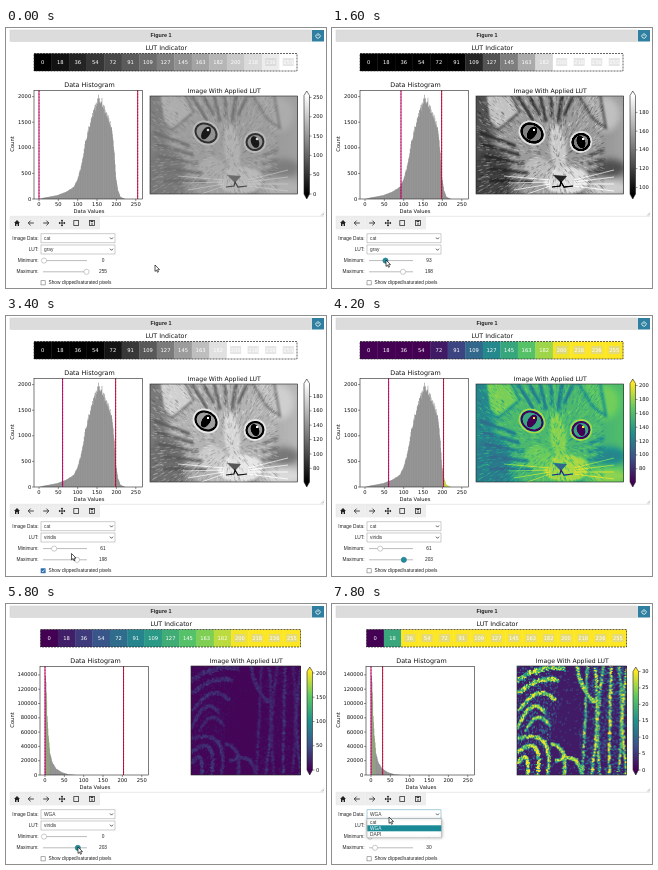
Write an HTML page with a canvas that moves like this. It is 320 px wide and 260 px high and loops after 8000 ms.

```html
<!DOCTYPE html>
<html lang="en">
<head>
<meta charset="utf-8">
<title>LUT explorer</title>
<style>
html, body { margin: 0; width: 100%; height: 100%; overflow: hidden; background: #fff; }
canvas { display: block; width: 320px; height: 260px; }
</style>
</head>
<body>
<canvas id="stage"></canvas>
<script>
const LOOP = 8000, STEP = 200;
const stage = document.getElementById('stage');
const c = stage.getContext('2d');
const dpr = window.devicePixelRatio || 1;
stage.width = 320 * dpr;
stage.height = 260 * dpr;
c.scale(dpr, dpr);

const PLOT_FONT = '"DejaVu Sans", sans-serif';
const UI_FONT = '"Liberation Sans", sans-serif';
const TEAL = '#238b9b';

// Timeline: [ms, value] keys, linear in between
const MIN = [[200, 0], [600, 93], [1600, 93], [2000, 61], [5200, 61], [5600, 0]];
const MAX = [[1000, 255], [1400, 198], [3600, 198], [3800, 203], [5800, 203], [6400, 36], [6600, 30]];
const CURSOR_X = [[0, 149], [400, 39], [600, 54], [800, 84], [1000, 80], [1400, 71], [1600, 54], [2000, 48],
  [2600, 63], [2800, 63], [3000, 72], [3200, 60], [3600, 71], [3800, 72], [4000, 38], [4200, 60],
  [4600, 62], [5000, 45], [5200, 49], [5600, 39], [5800, 72], [6400, 43], [6600, 41], [6800, 41], [7200, 70], [7800, 57]];
const CURSOR_Y = [[0, 237], [400, 232], [600, 232], [800, 244], [1400, 243], [1600, 232], [2000, 232],
  [2600, 254], [2800, 254], [3000, 221], [3200, 232], [3600, 243], [3800, 243], [4000, 255], [4200, 264],
  [4600, 211], [5000, 223], [5200, 233], [5600, 232], [5800, 243], [6800, 243], [7200, 211], [7400, 211], [7800, 213]];

function track(keys, t) {
  if (t <= keys[0][0]) return keys[0][1];
  for (let i = 1; i < keys.length; i++) {
    const [t0, a] = keys[i - 1], [t1, b] = keys[i];
    if (t <= t1) return a + (b - a) * (t - t0) / (t1 - t0);
  }
  return keys[keys.length - 1][1];
}
const during = (t, a, b) => t >= a && t < b;

// Colour maps
const MAPS = {
  gray: [[0, 0, 0], [255, 255, 255]],
  viridis: [[68, 1, 84], [59, 82, 139], [33, 145, 140], [94, 201, 98], [253, 231, 37]]
};
function mapColor(name, f) {
  const stops = MAPS[name], p = Math.max(0, Math.min(1, f)) * (stops.length - 1);
  const i = Math.min(stops.length - 2, Math.floor(p));
  return stops[i].map((v, k) => Math.round(v + (stops[i + 1][k] - v) * (p - i)));
}
const css = rgb => `rgb(${rgb})`;

// Drawing helpers
function rect(x, y, w, h, fill, stroke, lineWidth = .6, g = c) {
  if (fill) { g.fillStyle = fill; g.fillRect(x, y, w, h); }
  if (stroke) { g.strokeStyle = stroke; g.lineWidth = lineWidth; g.strokeRect(x, y, w, h); }
}
function path(points, stroke, width = .7, fill, g = c) {
  g.beginPath();
  points.forEach(([x, y], i) => i ? g.lineTo(x, y) : g.moveTo(x, y));
  if (fill) { g.closePath(); g.fillStyle = fill; g.fill(); }
  if (stroke) { g.strokeStyle = stroke; g.lineWidth = width; g.stroke(); }
}
function ellipse(x, y, rx, ry, fill, angle = 0, stroke, g = c) {
  g.beginPath();
  g.ellipse(x, y, rx, ry, angle, 0, Math.PI * 2);
  if (fill) { g.fillStyle = fill; g.fill(); }
  if (stroke) { g.strokeStyle = stroke; g.lineWidth = .6; g.stroke(); }
}
function text(s, x, y, size, align = 'center', color = '#111', font = PLOT_FONT, weight = '') {
  c.font = `${weight} ${size}px ${font}`;
  c.textAlign = align;
  c.textBaseline = 'middle';
  c.fillStyle = color;
  c.fillText(s, x, y);
}
function seeded(seed) {
  return () => (seed = (seed * 16807) % 2147483647) / 2147483647;
}

// Intensity images, tinted through the colour map when drawn
const tone = (v, a = 1) => `rgba(${v},${v},${v},${a})`;
function makeImage(w, h, paint) {
  const canvas = document.createElement('canvas');
  canvas.width = w;
  canvas.height = h;
  const g = canvas.getContext('2d', { willReadFrequently: true });
  paint(g);
  return { w, h, values: g.getImageData(0, 0, w, h).data };
}

const catImage = makeImage(148, 98, g => {
  const rnd = seeded(31);
  const blob = (x, y, rx, ry, v, angle) => ellipse(x, y, rx, ry, tone(v), angle, null, g);
  const line = (x0, y0, x1, y1, v, w) => path([[x0, y0], [x1, y1]], tone(v), w, null, g);
  g.filter = 'blur(3px)';
  const back = g.createLinearGradient(0, 0, 148, 0);
  back.addColorStop(0, tone(125));
  back.addColorStop(1, tone(160));
  rect(-9, -9, 170, 120, back, null, 0, g);
  blob(128, 18, 16, 18, 172);
  blob(134, 72, 16, 9, 125);
  blob(132, 92, 22, 8, 178);
  blob(70, 46, 53, 58, 157, -.2);
  blob(16, 80, 20, 28, 120);
  g.filter = 'blur(1.2px)';
  path([[9, -2], [34, -2], [44, 16], [22, 34], [13, 26]], tone(120), 2, tone(173), g);
  path([[102, -2], [124, -2], [130, 32], [118, 24]], tone(122), 2, tone(165), g);
  blob(90, 84, 23, 14, 184);
  blob(62, 74, 14, 12, 170);
  blob(82, 52, 8, 24, 176, -.12);
  for (let i = 0; i < 6; i++) line(42 + i * 11, 0, 58 + i * 6, 26 - i % 2 * 6, 108, 2.6);
  for (let i = 0; i < 5; i++) line(2 + i * 3, 36 + i * 12, 40 + i * 4, 50 + i * 9, 106, 2.4);
  for (let i = 0; i < 3; i++) line(112, 60 + i * 8, 128, 54 + i * 10, 115, 2);
  g.filter = 'none';
  for (let i = 0; i < 1500; i++) {
    const x = rnd() * 122 + 4, y = rnd() * 98, a = Math.atan2(y - 62, x - 82), r = 2 + rnd() * 3;
    path([[x, y], [x + Math.cos(a) * r, y + Math.sin(a) * r]], tone(rnd() < .5 ? 100 : 202, .32), .7, null, g);
  }
  g.filter = 'blur(.4px)';
  const eye = (x, y, rx, ry, angle) => {
    blob(x, y, rx + 3, ry + 3, 185, angle);
    blob(x, y, rx + 1, ry + 1, 48, angle);
    blob(x, y, rx - 1, ry - 1, 146, angle);
    blob(x, y, 4, ry - 2, 24, angle);
    blob(x + 2, y - 3, 1.3, 1.3, 215);
  };
  eye(56, 37, 11, 9, .55);
  eye(105, 46, 8.5, 8, -.35);
  path([[77, 79], [91, 80], [85, 87]], null, 0, tone(108), g);
  path([[76, 91], [84, 90], [85, 86], [88, 91], [97, 90]], tone(70), 1.2, null, g);
  for (let i = 0; i < 4; i++) {
    line(74, 84 + i * 2, 28 + i * 5, 80 + i * 7, 208, .6);
    line(98, 84 + i * 2, 138, 74 + i * 7, 208, .6);
  }
});

const TISSUE_GAIN = 5;
const tissueImage = makeImage(110, 110, g => {
  const rnd = seeded(77);
  rect(0, 0, 110, 110, tone(12), null, 0, g);
  const speck = (x, y, v, s = 1) => rect(x, y, s, s, tone(Math.min(255, v | 0)), null, 0, g);
  for (let i = 0; i < 2600; i++) {
    const x = rnd() * 110, y = rnd() * 110;
    const middle = x > 34 + 9 * Math.sin(y / 22) && x < 66 + 4 * Math.sin(y / 15);
    if (!middle || rnd() < .2) speck(x, y, 25 + rnd() * (x > 66 || x < 35 ? 85 : 45));
  }
  const fibre = (x0, y0, x1, y1, x2, y2, spread, peak) => {
    for (let i = 0; i < 330; i++) {
      const u = rnd(), w = 1 - u, jitter = () => (rnd() + rnd() - 1) * spread;
      speck(w * w * x0 + 2 * w * u * x1 + u * u * x2 + jitter(),
        w * w * y0 + 2 * w * u * y1 + u * u * y2 + jitter(), 50 + rnd() * peak, rnd() < .3 ? 1.5 : 1);
    }
  };
  // folds on the left
  fibre(0, 14, 22, -2, 46, 2, 3, 160);
  fibre(0, 27, 24, 8, 40, 14, 2.5, 170);
  fibre(2, 44, 20, 15, 38, 34, 2, 170);
  fibre(0, 62, 14, 28, 27, 46, 2, 160);
  fibre(8, 65, 20, 40, 32, 60, 1.5, 130);
  fibre(0, 73, 38, 60, 30, 112, 2, 180);
  fibre(0, 86, 26, 66, 20, 110, 2, 180);
  fibre(0, 98, 12, 80, 10, 110, 2, 170);
  fibre(34, 78, 52, 82, 46, 110, 2, 140);
  fibre(38, 96, 60, 84, 64, 108, 2, 150);
  // long strands on the right
  for (let i = 0; i < 6; i++) {
    const x = 68 + i * 8;
    fibre(x + 2, 0, x + 8 * Math.sin(i * 2.1), 55, x - 3 + i, 110, 1.6, i % 2 ? 190 : 130);
  }
  fibre(60, 0, 62, 22, 78, 36, 2, 150);
});

const scratch = document.createElement('canvas');
function drawImage(image, gain, x, y, w, h, color) {
  scratch.width = image.w;
  scratch.height = image.h;
  const g = scratch.getContext('2d');
  const out = g.createImageData(image.w, image.h);
  const table = Array.from({ length: 256 }, (_, v) => color(v / gain));
  for (let i = 0; i < out.data.length; i += 4) {
    const rgb = table[image.values[i]];
    for (let k = 0; k < 3; k++) out.data[i + k] = rgb[k];
    out.data[i + 3] = 255;
  }
  g.putImageData(out, 0, 0);
  c.drawImage(scratch, x, y, w, h);
  rect(x, y, w, h, null, '#222', .6);
}

// Layout and histogram profile (value, count) of each data set
const DATA = {
  cat: {
    image: catImage, gain: 1, left: 28, strip: [28, 263], box: [144, 68, 147.5, 98], bar: 298,
    top: 2000, tick: 500, perTick: 25.6,
    profile: [[0, 0], [12, 25], [45, 70], [70, 140], [90, 240], [101, 430], [111, 720], [119, 1120], [126, 1330],
      [134, 1520], [144, 1780], [153, 1960], [160, 1950], [166, 1830], [173, 1660], [183, 1510], [188, 1370],
      [193, 1000], [198, 440], [203, 180], [210, 40], [222, 0]]
  },
  WGA: {
    image: tissueImage, gain: TISSUE_GAIN, left: 34, strip: [34.5, 260], box: [185, 62, 109.5, 109], bar: 301,
    top: 140000, tick: 20000, perTick: 14.3,
    profile: [[0, 146000], [3, 118000], [5, 86000], [8, 56000], [12, 32000], [18, 18000], [28, 9000], [42, 4000], [60, 800], [80, 0]]
  }
};

function drawHistogram(d, min, max, lut) {
  const x0 = d.left + 5, scale = .387, bottom = 171, unit = d.perTick / d.tick;
  const rnd = seeded(5);
  const mid = d.left + 54;
  for (let v = 0; v < 225; v++) {
    const h = track(d.profile, v) * unit * (.95 + rnd() * .09);
    let fill = '#808080';
    if (lut === 'viridis' && d.gain === 1 && v > max) fill = '#b8cf35';
    if (d.gain > 1 && v > 2 && v < 11) fill = '#7d9364';
    rect(x0 + v * scale, bottom - h, scale + .15, h, fill);
  }
  for (const [v, color] of [[min, '#d4006e'], [max, '#d90b35']]) {
    const x = x0 + v * scale;
    path([[x, 62.5], [x, 171]], color, 1);
    c.setLineDash([1.5, 1.5]);
    path([[x, 62.5], [x, 171]], '#70103c', .6);
    c.setLineDash([]);
  }
  rect(d.left, 62.5, 108.5, 108.5, null, '#222', .6);
  for (let v = 0; v <= 250; v += 50) {
    const x = x0 + v * scale;
    path([[x, 171], [x, 173]], '#222', .5);
    text(v, x, 177, 5.2);
  }
  for (let v = 0; v <= d.top; v += d.tick) {
    const y = bottom - v * unit;
    path([[d.left - 2, y], [d.left, y]], '#222', .5);
    text(v, d.left - 2.8, y + .2, 5.2, 'right');
  }
  text('Data Histogram', mid + 1.5, 57.5, 6.4);
  text('Data Values', mid + 1, 184, 5.2);
  c.save();
  c.translate(7, 116);
  c.rotate(-Math.PI / 2);
  text('Count', 0, 0, 5.2);
  c.restore();
}

function drawColorbar(x, min, max, lut) {
  const top = 67.5, h = 98.5, w = 5.5;
  const grad = c.createLinearGradient(0, top, 0, top + h);
  for (let i = 0; i <= 8; i++) grad.addColorStop(i / 8, css(mapColor(lut, 1 - i / 8)));
  path([[x, top], [x + w / 2, 63], [x + w, top], [x + w, top + h], [x + w / 2, 171], [x, top + h], [x, top]], '#222', .6, grad);
  const range = max - min;
  const tick = [1, 2, 5, 10, 20, 50].find(s => range / s <= 9);
  for (let v = Math.ceil(min / tick) * tick; v <= max; v += tick) {
    const y = top + h * (max - v) / range;
    path([[x + w, y], [x + w + 2, y]], '#222', .5);
    text(v, x + w + 3.5, y + .2, 5.2, 'left');
  }
}

function drawIndicator([x, w], color, fraction) {
  const cell = w / 15;
  text('LUT Indicator', x + w / 2 + .8, 20, 6.3);
  for (let i = 0; i < 15; i++) {
    const v = Math.floor(i * 255 / 14), mid = x + (i + .5) * cell;
    rect(x + i * cell, 25.5, cell + .3, 17.5, css(color(v)));
    if (fraction(v) > .9) rect(mid - 5.5, 30, 11, 8, 'rgba(205,205,205,.5)');
    text(v, mid, 34.2, 5.2, 'center', '#fff');
  }
  c.setLineDash([2, 1]);
  rect(x, 25.5, w, 17.5, null, '#222', .7);
  c.setLineDash([]);
}

function drawFigure(t, ui) {
  const min = track(MIN, t), max = track(MAX, t);
  const d = DATA[during(t, 5200, LOOP) ? 'WGA' : 'cat'];
  const lut = t >= 3400 ? 'viridis' : 'gray';
  const fraction = v => (v - min) / (max - min);
  const color = v => mapColor(lut, fraction(v));
  drawIndicator(d.strip, color, fraction);
  drawHistogram(d, min, max, lut);
  const [x, y, w, h] = d.box;
  text('Image With Applied LUT', x + w / 2 + .5, y - 5, 6.1);
  drawImage(d.image, d.gain, x, y, w, h, color);
  drawColorbar(d.bar, min, max, lut);
}

function drawFrame() {
  rect(4, 2, 301.5, 11.5, '#dcdcdc', '#cfcfcf', .5);
  text('Figure 1', 155, 7.5, 5.4, 'center', '#222', UI_FONT, 'bold');
  rect(306, 2, 12, 11.5, '#2e7fa0');
  c.beginPath();
  c.arc(312, 8, 2.2, -.9, Math.PI + .9);
  c.strokeStyle = '#fff';
  c.lineWidth = .8;
  c.stroke();
  path([[312, 5], [312, 8]], '#fff', .8);
  path([[4, 188.3], [318, 188.3]], '#d8d8d8', .6);
  path([[315, 187.5], [318, 184.5]], '#888', .5);
  path([[316.5, 187.5], [318, 186]], '#888', .5);
}

function drawToolbar() {
  const y = 195;
  for (let i = 0; i < 6; i++) rect(4 + i * 15.1, 189, 14.2, 12, '#eee', '#e2e2e2', .4);
  path([[8, y], [11, 192], [14, y], [13, y], [13, 198], [11.6, 198], [11.6, 196], [10.4, 196], [10.4, 198], [9, 198], [9, y]], null, 0, '#222');
  for (const [x, dir] of [[25, -1], [40, 1]]) {
    path([[x - 2.8, y], [x + 2.8, y]], '#333', .9);
    path([[x + dir * .4, y - 2.4], [x + dir * 2.8, y], [x + dir * .4, y + 2.4]], '#333', .9);
  }
  path([[53, y], [59, y]], '#222', .9);
  path([[56, y - 3], [56, y + 3]], '#222', .9);
  for (const [dx, dy] of [[1, 0], [-1, 0], [0, 1], [0, -1]]) {
    path([[56 + dx * 3.4, y + dy * 3.4], [56 + dx * 2 + dy * 1.2, y + dy * 2 + dx * 1.2],
      [56 + dx * 2 - dy * 1.2, y + dy * 2 - dx * 1.2]], null, 0, '#222');
  }
  rect(67.8, y - 2.4, 4.8, 4.8, null, '#333', .8);
  rect(83.5, y - 2.5, 5, 5, null, '#333', .8);
  rect(84.6, y - 2.4, 2.6, 1.5, '#333');
  ellipse(86, y + 1, .8, .8, '#333');
}

function drawSelect(label, value, y, focused) {
  text(label, 32.5, y, 4.8, 'right', '#222', UI_FONT);
  rect(35, y - 4.5, 74, 9, '#fff', focused ? '#6aaec4' : '#aaa', .6);
  text(value, 38, y, 4.8, 'left', '#333', UI_FONT);
  path([[104, y - .8], [105.5, y + .8], [107, y - .8]], '#333', .8);
}

function drawSlider(label, value, y, active) {
  text(label, 32.5, y, 4.8, 'right', '#222', UI_FONT);
  path([[37, y], [81, y]], '#bbb', 1);
  ellipse(38 + value / 6, y, 2.6, 2.6, active ? TEAL : '#fff', 0, active ? '#1b7483' : '#aaa');
  text(Math.round(value), 97, y, 4.8, 'center', '#222', UI_FONT);
}

function drawControls(t) {
  const open = during(t, 4600, 5000) || t >= 7400;
  const minActive = during(t, 400, 1000) || during(t, 1600, 2200) || during(t, 5200, 5800);
  const maxActive = during(t, 1000, 1600) || during(t, 3600, 4400) || during(t, 5800, 7000);
  drawSelect('Image Data:', t >= 5000 ? 'WGA' : 'cat', 210.3, open);
  drawSelect('LUT:', t >= 3400 ? 'viridis' : 'gray', 221.5);
  drawSlider('Minimum:', track(MIN, t), 232.6, minActive);
  drawSlider('Maximum:', track(MAX, t), 243.8, maxActive);
  const checked = during(t, 2600, 4000);
  rect(35, 252.7, 4.2, 4.2, checked ? '#2b6ca8' : '#fff', checked ? '#2b6ca8' : '#777', .6);
  if (checked) path([[35.8, 254.8], [36.8, 255.9], [38.5, 253.6]], '#fff', .8);
  text('Show clipped/saturated pixels', 42.5, 255, 4.75, 'left', '#222', UI_FONT);
  if (open) {
    c.save();
    c.shadowColor = 'rgba(0,0,0,.3)';
    c.shadowBlur = 3 * dpr;
    rect(35, 214.8, 74.5, 19, '#fff', '#aaa', .5);
    c.restore();
    rect(35.3, 221.3, 74, 6, '#198a96');
    ['cat', 'WGA', 'DAPI'].forEach((name, i) =>
      text(name, 38, 218.3 + i * 6, 4.8, 'left', i === 1 ? '#fff' : '#333', UI_FONT));
  }
}

function drawCursor(t) {
  const x = track(CURSOR_X, t), y = track(CURSOR_Y, t);
  const shape = [[0, 0], [0, 6.4], [1.5, 5.1], [2.5, 7.3], [3.5, 6.8], [2.6, 4.7], [4.5, 4.6], [0, 0]];
  path(shape.map(([dx, dy]) => [x + dx, y + dy]), '#111', .7, '#fff');
}

function draw(t) {
  rect(0, 0, 320, 260, '#fff');
  drawFrame();
  drawFigure(t - STEP, t); // the plot trails the controls by one step
  drawToolbar();
  drawControls(t);
  drawCursor(t);
}

let shown = -1;
function tick() {
  const t = Math.floor(performance.now() % LOOP / STEP) * STEP;
  if (t !== shown) draw(shown = t);
  requestAnimationFrame(tick);
}
tick();
</script>
</body>
</html>
```
